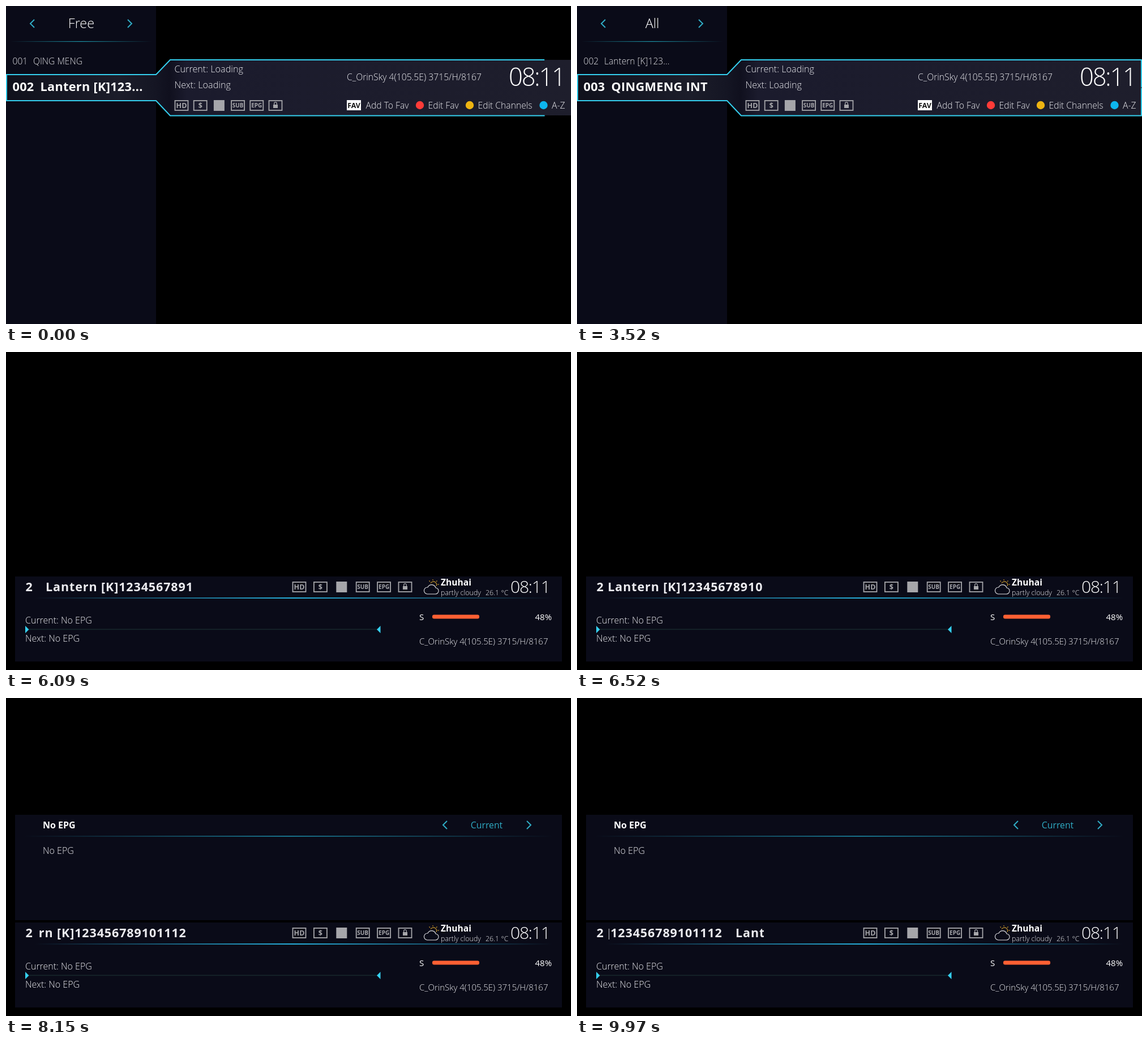
An HTML page for the animation above (10 s loop, 998x561 px).

```html
<!DOCTYPE html>
<html lang="en">
<head>
<meta charset="utf-8">
<title>Channel list</title>
<style>
  html, body { margin: 0; width: 100%; height: 100%; overflow: hidden; background: #000; }
  svg { display: block; width: 998px; height: 561px; font-family: "Open Sans", "Noto Sans", sans-serif; }
  text { white-space: pre; }
</style>
</head>
<body>
<svg id="stage" viewBox="0 0 998 561"></svg>
<script>
const LOOP = 10000;
const SATELLITE = 'C_OrinSky 4(105.5E) 3715/H/8167';
const NAME = 'Lantern [K]123456789101112';
const ROWS = ['QING MENG', 'Lantern [K]123...', 'QINGMENG INT'];
const PANEL = '#0a0b18', CYAN = '#35cfee', TEAL = '#2fabc4';

// Markup helpers
const text = (x, y, str, size = 16, { weight = 350, fill = '#ececf0', anchor = 'start', extra = '' } = {}) =>
  `<text x="${x}" y="${y}" font-size="${size}" font-weight="${weight}" fill="${fill}" text-anchor="${anchor}" ${extra}>${str}</text>`;
const rect = (x, y, w, h, fill, extra = '') =>
  `<rect x="${x}" y="${y}" width="${w}" height="${h}" fill="${fill}" ${extra}/>`;
const line = (d, stroke, width = 2, extra = '') =>
  `<path d="${d}" fill="none" stroke="${stroke}" stroke-width="${width}" ${extra}/>`;
const group = (id, content, extra = '') => `<g id="${id}" ${extra}>${content}</g>`;
const gradient = (id, stops) => `<linearGradient id="${id}">${stops.map(([at, color, alpha = 1]) =>
  `<stop offset="${at}" stop-color="${color}" stop-opacity="${alpha}"/>`).join('')}</linearGradient>`;
const glow = (id, color) => gradient(id, [[0, color, 0], [.5, color], [1, color, 0]]);
const chevrons = (left, right, y) =>
  line(`M${left + 4} ${y - 7}l-7 7 7 7M${right - 3} ${y - 7}l7 7-7 7`, TEAL);
const dot = (x, color) => `<circle cx="${x}" cy="175" r="7.2" fill="${color}"/>`;

function icons(x, y, pitch) {
  const grey = '#a6a6aa';
  return ['HD', '$', 'square', 'SUB', 'EPG', 'lock'].map((kind, i) => {
    const left = x + i * pitch, mid = left + 12.5;
    if (kind === 'square') return rect(mid - 9.5, y, 19, 19, grey);
    const frame = rect(left + 1, y + 1, 23, 17, 'none', `stroke="${grey}" stroke-width="1.8"`);
    if (kind === 'lock') return frame + rect(mid - 4, y + 8, 8, 6, grey) +
      line(`M${mid - 2.3} ${y + 8}v-2a2.3 2.3 0 0 1 4.6 0v2`, grey, 1.3);
    const size = kind.length > 2 ? 10 : 12.5;
    return frame + text(mid, y + 9.5 + size * .36, kind, size, { weight: 700, fill: grey, anchor: 'middle' });
  }).join('');
}

const weather = line('M744 427h14a5.5 5.5 0 0 0 1-11a7.5 7.5 0 0 0-14-1a6 6 0 0 0-1 12z', '#e0e0e4', 1.1) +
  line('M750 408a5 5 0 0 1 10 5M754 403v-2M749 405l-1.5-1.5M760 405l1.5-1.5M762 410h3', '#cf9c2c', 1.1) +
  text(768, 412, 'Zhuhai', 15.6, { weight: 700, fill: '#fff' }) +
  text(768, 429, 'partly cloudy', 12.4) + text(847, 429, '26.1 °C', 12.4);

const listView =
  rect(0, 0, 265, 561, PANEL) +
  chevrons(46, 218, 31) +
  text(133, 39, '', 23.5, { weight: 300, anchor: 'middle', fill: '#fff', extra: 'id="title"' }) +
  rect(8, 62, 250, 1.2, 'url(#headLine)') +
  `<path d="M0 121H265L290 95H998V193H290L265 167H0Z" fill="url(#focusFill)"/>` +
  line('M1 144V121H265L290 95H997V143.5', CYAN, 2, 'class="border" pathLength="1"') +
  line('M1 144V167H265L290 193.5H997V144.5', CYAN, 2, 'class="border" pathLength="1"') +
  group('rows', ROWS.map((name, i) => group('row' + i, text(0, 0, '00' + (i + 1)) + text(0, 0, name))).join('')) +
  text(297.5, 117, '', 16.2, { extra: 'class="current"' }) +
  text(297.5, 145, '', 16.2, { extra: 'class="next"' }) +
  icons(297.5, 166, 33.2) +
  text(602, 131, SATELLITE, 15.7, { extra: 'id="satellite"' }) +
  group('signal', text(602, 145, 'S', 15) + rect(633, 135.5, 119, 7, '#ff6033', 'rx="3"') +
    text(836, 145, '78%', 15, { anchor: 'end' })) +
  text(888, 140.5, '08:11', 43.5, { weight: 300, fill: '#fff', extra: 'letter-spacing="-2.2"' }) +
  rect(602, 166, 25, 18, '#fff') +
  text(614.5, 179.5, 'FAV', 12.4, { weight: 700, fill: '#111', anchor: 'middle' }) +
  text(635.5, 181, 'Add To Fav', 15.7) +
  dot(731, '#ff3b38') + text(745.5, 181, 'Edit Fav', 15.7) +
  dot(819, '#eeb412') + text(833.5, 181, 'Edit Channels', 15.7) +
  dot(949.5, '#0db5ee') + text(964, 181, 'A-Z', 15.7);

const infoBar =
  rect(16, 396, 966, 150, PANEL) +
  text(34.5, 422, '2', 21.5, { weight: 700 }) +
  `<g clip-path="url(#nameClip)">` + group('marquee', [70, 420].map(x =>
    text(x, 421.5, NAME, 21.5, { weight: 700, extra: 'letter-spacing=".9"' })).join('')) + '</g>' +
  icons(505.5, 405, 37.4) +
  group('weather', weather) +
  text(891, 425, '08:11', 30, { weight: 300, fill: '#fff', extra: 'letter-spacing="-1.2"' }) +
  rect(50, 433, 915, 2, 'url(#barLine)') +
  text(34, 479, '', 16, { extra: 'class="current"' }) +
  rect(40, 488.5, 616, 1.6, '#16262b') +
  `<path d="M34 483l6.5 6.5-6.5 6.5zM661.5 483l-6.5 6.5 6.5 6.5z" fill="${CYAN}"/>` +
  text(34, 511, '', 16, { extra: 'class="next"' }) +
  group('barSignal', text(730, 473, 'S', 15, { weight: 400, fill: '#fff' }) +
    rect(753, 463.5, 83, 7, '#ff6033', 'rx="3"') +
    text(964, 473, '48%', 15, { weight: 400, anchor: 'end', fill: '#fff' })) +
  text(730, 516, SATELLITE, 15);

const guide =
  rect(16, 206, 966, 186, PANEL) +
  text(65, 230, 'No EPG', 16, { weight: 700, fill: '#fff' }) +
  chevrons(775, 923, 224) +
  text(849, 230, 'Current', 15.8, { weight: 400, fill: TEAL, anchor: 'middle' }) +
  rect(30, 243, 938, 1.6, 'url(#guideLine)') +
  text(65, 275, 'No EPG', 16);

const $ = id => document.getElementById(id);
const all = selector => document.querySelectorAll(selector);
$('stage').innerHTML = `<defs>
  ${glow('headLine', '#1c93a6')}${glow('barLine', '#27b0dc')}${glow('guideLine', '#1b8aa6')}
  ${gradient('focusFill', [[0, '#10111c'], [.2, '#1c1d2a'], [.262, '#151624'], [.289, '#10101e'], [.32, '#1b1b2d'], [1, '#1e1e2c']])}
  <clipPath id="nameClip"><rect x="56" y="398" width="274" height="34"/></clipPath></defs>` +
  group('list', listView) + group('guide', guide) + group('bar', infoBar);

// Timing helpers
const ramp = (t, from, to) => Math.min(1, Math.max(0, (t - from) / (to - from)));
const ease = k => 1 - (1 - k) ** 3;
const fade = (id, alpha) => $(id).setAttribute('opacity', alpha);
const between = (t, keys) => {
  const i = Math.max(1, keys.findIndex(([at]) => at >= t));
  const [[t0, a], [t1, b]] = [keys[i - 1], keys[i]];
  return a + (b - a) * ramp(t, t0, t1);
};

const BORDER_STARTS = [-364, 900, 3120, 3540];
const SCROLL = [[6090, 0], [7240, 42], [8150, 78], [LOOP, 141]];

function drawRows(t) {
  const scroll = ease(ramp(t, 3120, 3360)) - ease(ramp(t, 3540, 3780));
  fade('rows', t < 900 ? 1 : ramp(t, 900, 1200));
  ROWS.forEach((_, i) => {
    const slot = i - scroll, focused = Math.abs(slot - 1) < .5;
    const y = 103 + slot * 46 + (focused ? 1 : 0);
    const visible = i < 2 || t >= 900;
    fade('row' + i, visible ? ramp(slot, -1, 0) : 0);
    [...$('row' + i).children].forEach((label, column) => {
      label.setAttribute('x', column ? (focused ? 60.5 : 48) : 11.5);
      label.setAttribute('y', y);
      label.setAttribute('font-size', focused ? 21.7 : 15.6);
      label.setAttribute('letter-spacing', focused ? .3 : 0);
      label.setAttribute('font-weight', focused ? 700 : 350);
      label.setAttribute('fill', focused ? '#fff' : '#e0e0e4');
    });
  });
}

function draw(t) {
  const closing = ramp(t, 4860, 5060), opening = ease(ramp(t, 4900, 5200));
  const loading = t < 1700 || (t >= 3120 && t < 5700);
  const state = loading ? 'Loading' : 'No EPG';

  $('title').textContent = t < 900 ? 'Free' : 'All';
  all('.current').forEach(el => el.textContent = 'Current: ' + state);
  all('.next').forEach(el => el.textContent = 'Next: ' + state);

  const start = BORDER_STARTS.filter(s => s <= t).pop();
  all('.border').forEach(el => el.setAttribute('stroke-dasharray', ramp(t, start, start + 400) + ' 2'));
  drawRows(t);

  const signal = ramp(t, 4465, 4865);
  fade('signal', signal);
  $('satellite').setAttribute('y', 131 - 11 * signal);

  fade('list', 1 - closing);
  fade('bar', opening);
  $('bar').setAttribute('transform', `translate(0 ${(1 - opening) * 165})`);
  fade('weather', ramp(t, 5350, 5650));
  fade('barSignal', ramp(t, 5400, 5700));
  fade('guide', ramp(t, 6650, 6900));
  $('marquee').setAttribute('transform', `translate(${-between(t, SCROLL)} 0)`);
}

function tick() {
  draw(performance.now() % LOOP);
  requestAnimationFrame(tick);
}
tick();
</script>
</body>
</html>
```
